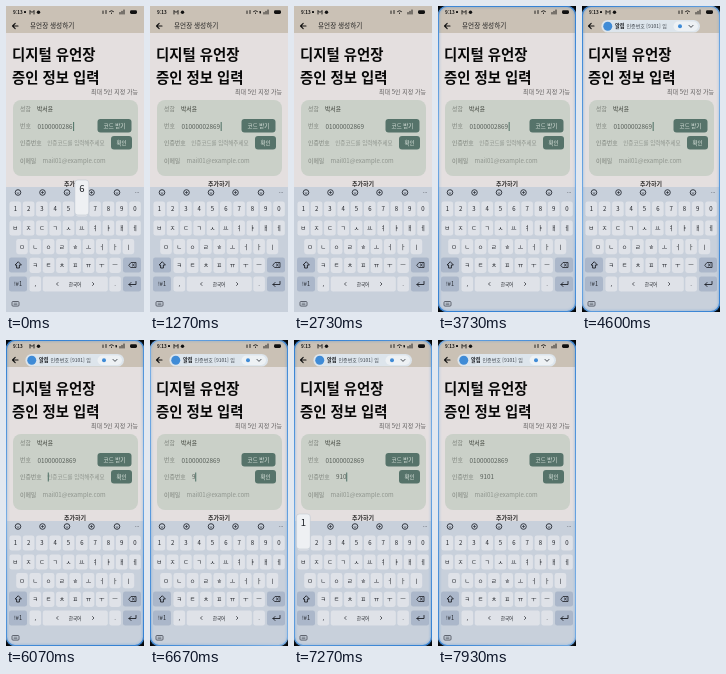
These frames come from a looping animation (138x306 px, 8000 ms). An HTML page:

```html
<!DOCTYPE html>
<html lang="ko">
<head>
<meta charset="utf-8">
<style>
html, body { margin: 0; width: 100%; height: 100%; overflow: hidden; background: #e4dfdf; }
svg { display: block; width: 138px; height: 306px; }
text { font-family: "Noto Sans CJK KR", "Noto Sans CJK", "Noto Sans", sans-serif; }
</style>
</head>
<body>
<svg id="stage" viewBox="0 0 138 306"></svg>
<script>
const LOOP = 8000;
const PHONE = '01000002869';
const LAST_DIGIT = 200, CODE_FOCUS = 4950;
const CODE = [['9', 6600], ['1', 6900], ['0', 7100], ['1', 7350]];
const PLACEHOLDER = '인증코드를 입력해주세요';
const KEY = '#dfe2e8', SPECIAL = '#abb7ca', INK = '#1d2026';

const rect = (x, y, w, h, r, fill, extra = '') =>
  `<rect x="${x}" y="${y}" width="${w}" height="${h}" rx="${r}" fill="${fill}" ${extra}/>`;
const line = (d, color = INK, w = 0.9) =>
  `<path d="${d}" fill="none" stroke="${color}" stroke-width="${w}" stroke-linecap="round" stroke-linejoin="round"/>`;
// y is the visual middle of the line
const text = (s, x, y, size, fill, extra = '') =>
  `<text x="${x}" y="${y + size * 0.36}" font-size="${size}" fill="${fill}" ${extra}>${s}</text>`;
const mid = 'text-anchor="middle"';
const medium = 'font-weight="500"', bold = 'font-weight="700"', black = 'font-weight="900"';

const keyX = i => 9.3 + 13.3 * i;
const keyRow = (chars, x0, y) => [...chars].map((c, i) => {
  const x = x0 + 13.3 * i;
  return rect(x - 5.8, y - 7.6, 11.6, 15.2, 2.4, KEY) + text(c, x, y, 6, INK, `${mid} ${medium}`);
}).join('');

function statusBar() {
  return text('9:13', 7, 6, 4.6, '#111', bold)
    + rect(18, 5, 2, 2, 0.5, '#111', 'id="dot"')
    + line('M24 8V4.5l2 2l2-2V8', '#111')
    + '<circle cx="32.5" cy="6.2" r="1.7" fill="#111"/>'
    + line('M97 7.5V5M100 7.5v-3M103.5 5.5a3 3 0 0 1 4 0M105.5 7.5v-.5M114 8V6.5M116 8V5.3M118 8V4', '#111')
    + rect(109.5, 5, 1.5, 2.5, 0.4, '#111', 'id="traffic"')
    + rect(124, 4.2, 7, 3.8, 1.4, '#111');
}

function page() {
  const label = (s, y) => text(s, 14, y, 5.9, '#7d827b');
  const button = (s, x, y, w) =>
    rect(x, y, w, 13.5, 3, '#56736a') + text(s, x + w / 2, y + 6.7, 5.5, '#dfe7e1', `${mid} ${medium}`);
  return rect(0, 0, 138, 306, 0, '#e4dfdf')
    + rect(0, 0, 138, 27, 0, '#cac1b5')
    + statusBar()
    + line('M12 20H6.7M9.2 17.3L6.5 20L9.2 22.7', '#111', 1.1)
    + text('유언장 생성하기', 24, 19.8, 6.6, '#222', medium)
    + text('디지털 유언장', 6, 49, 14.4, '#080808', black)
    + text('증인 정보 입력', 6, 72, 14.4, '#080808', black)
    + text('최대 5인 지정 가능', 132, 86.3, 6, '#5e5c5c', 'text-anchor="end"')
    + rect(7, 94, 125, 76, 8, '#cad0c8')
    + label('성함', 103) + label('번호', 120) + label('인증번호', 137) + label('이메일', 155)
    + text('박서윤', 31, 103, 5.8, '#33372f', medium)
    + text('', 31.5, 120.3, 6.3, '#555d57', 'id="phone"')
    + text('', 41.3, 137, 5.5, '', 'id="code"')
    + text('mail01@example.com', 36.5, 155, 6.1, '#8e948d')
    + button('코드 받기', 91.5, 113, 34) + button('확인', 105, 130, 21)
    + rect(0, 116, 0.9, 9, 0, '#3f665a', 'id="caret"')
    + text('추가하기', 69, 178, 6, '#2d2c2c', `${mid} ${bold}`);
}

function keyboard() {
  const tools = [12, 36.5, 61, 85.5, 111].map((x, i) =>
    `<circle cx="${x}" cy="186.5" r="2.8" fill="none" stroke="#343942"/>`
    + line(i % 2 ? `M${x - 1} 186.5h2M${x} 185.5v2` : `M${x - 1} 187q1 1 2 0`, '#343942', 0.8)).join('');
  const special = (x, y) => rect(x, y - 7.6, 18, 15.2, 2.4, SPECIAL);
  return rect(0, 181, 138, 125, 0, '#c8d0db') + tools
    + text('···', 131, 186.5, 6, '#343942', mid)
    + keyRow('1234567890', keyX(0), 203)
    + keyRow('ㅂㅈㄷㄱㅅㅛㅕㅑㅐㅔ', keyX(0), 222)
    + keyRow('ㅁㄴㅇㄹㅎㅗㅓㅏㅣ', 16, 240.6)
    + special(3, 259) + line('M12 256l-3 3h1.6v3h2.8v-3h1.6z')
    + keyRow('ㅋㅌㅊㅍㅠㅜㅡ', 29.3, 259.3)
    + special(117, 259) + line('M123 259l2-2.5h5v5h-5zM126.4 258l2 2m0-2l-2 2', INK, 0.8)
    + special(3, 278) + text('!#1', 12, 278, 5.6, INK, `${mid} ${medium}`)
    + keyRow(',', 29.3, 278)
    + rect(36.8, 270.4, 65, 15.2, 2.4, KEY) + text('한국어', 69, 278, 4.6, INK, mid)
    + line('M52 276.5l-1.5 1.5l1.5 1.5M86.5 276.5l1.5 1.5l-1.5 1.5', INK, 0.7)
    + keyRow('.', 109.1, 278)
    + special(117, 278) + line('M130 275.5v3h-7m2-2l-2 2l2 2')
    + rect(6, 295.5, 7, 4.6, 1, 'none', 'stroke="#444a55" stroke-width=".8"')
    + line('M8 297.2h3M8 298.6h3', '#444a55', 0.6);
}

function overlays() {
  return '<g id="popup">' + rect(-7, 174, 14, 35, 3, '#eef0f3', 'stroke="#b9c0cb" stroke-width=".5"')
    + text('', 0, 182.5, 9.5, INK, `${mid} id="digit"`) + '</g>'
    + '<g id="notice">' + rect(19.5, 14, 98, 12.6, 6.3, '#dde5ec', 'id="pill"')
    + '<g id="icon"><circle r="4.5" fill="#3f8bd6"/></g>'
    + '<g id="message">' + text('알림', 33, 20.3, 5.2, '#15181c', bold)
    + text('인증번호 [9101] 입', 44.5, 20.3, 5, '#3d444c')
    + rect(91.5, 15.6, 24.5, 9.4, 4.7, '#edf1f4')
    + '<circle cx="98" cy="20.3" r="2" fill="#3f8bd6"/>'
    + line('M107 19.4l2 2l2-2', '#2c3239') + '</g></g>'
    + '<g id="glow"><path fill="#000" fill-rule="evenodd" d="M0 0H138V306H0ZM9 0H129a9 9 0 0 1 9 9V297a9 9 0 0 1-9 9H9a9 9 0 0 1-9-9V9a9 9 0 0 1 9-9Z"/>'
    + '<g fill="none" stroke="url(#edge)">'
    + '<rect x=".5" y=".5" width="137" height="305" rx="8.5" stroke-width="2.6" opacity=".3" filter="url(#soft)"/>'
    + '<rect x=".5" y=".5" width="137" height="305" rx="8.5" stroke-width="1.1"/></g></g>';
}

const $ = id => document.getElementById(id);
$('stage').innerHTML = `<defs>
  <linearGradient id="edge" gradientUnits="userSpaceOnUse" x1="0" y1="0" x2="138" y2="306">
    <stop offset="0" stop-color="#2f7ed2"/><stop offset=".5" stop-color="#79aee4"/><stop offset="1" stop-color="#2f7ed2"/>
  </linearGradient>
  <filter id="soft" filterUnits="userSpaceOnUse" x="-10" y="-10" width="158" height="326"><feGaussianBlur stdDeviation=".9"/></filter>
</defs>` + page() + keyboard() + overlays();

const ramp = (t, a, b) => {
  const p = Math.min(1, Math.max(0, (t - a) / (b - a)));
  return 1 - (1 - p) ** 3;
};
const show = (id, on) => $(id).setAttribute('visibility', on ? 'visible' : 'hidden');
const set = (id, attrs) => Object.entries(attrs).forEach(([k, v]) => $(id).setAttribute(k, v));

// The caret restarts its blink whenever the field changes
const RESTARTS = [0, LAST_DIGIT + 28, 3470, CODE_FOCUS, ...CODE.map(([, at]) => at)];

function drawFields(t) {
  const code = CODE.filter(([, at]) => t >= at).map(([d]) => d).join('');
  const inCode = t >= CODE_FOCUS;
  $('phone').textContent = t < LAST_DIGIT ? PHONE.slice(0, -1) : PHONE;
  $('code').textContent = code || PLACEHOLDER;
  set('code', code
    ? { x: 42, fill: '#555d57', 'font-size': 6.3 }
    : { x: 41.3, fill: '#8e948d', 'font-size': 5.5 });

  const since = RESTARTS.filter(at => t >= at).pop();
  show('caret', (t - since) % 1000 < 500);
  set('caret', {
    x: inCode ? 41.8 + 3.5 * code.length : t < LAST_DIGIT ? 67.2 : 70.7,
    y: inCode ? 132.5 : 116
  });

  const press = [['6', -60, 75], [PHONE.at(-1), LAST_DIGIT, 400], ...CODE.map(([d, at]) => [d, at - 80, at + 40])]
    .find(([, from, to]) => t >= from && t < to);
  show('popup', press);
  if (press) {
    $('digit').textContent = press[0];
    set('popup', { transform: `translate(${keyX((+press[0] + 9) % 10)} 0)` });
  }
}

function drawNotice(t) {
  set('glow', { opacity: ramp(t, 3450, 3750) });
  set('edge', { gradientTransform: `rotate(${(t - 3450) / 2600 * 360} 69 153)` });
  const pop = ramp(t, 3780, 3980), open = ramp(t, 3930, 4300);
  const width = 12.6 + 85.9 * open;
  show('notice', pop > 0);
  set('notice', { opacity: pop });
  set('pill', { x: 68.7 - width / 2, width });
  set('icon', { transform: `translate(${75 - width / 2} 20.3) scale(${pop})` });
  set('message', { opacity: ramp(t, 4100, 4350) });
}

function frame() {
  const t = performance.now() % LOOP;
  const tick = Math.floor((t - 590) / 490) % 2 === 0;
  show('dot', tick);
  show('traffic', !tick);
  drawFields(t);
  drawNotice(t);
  requestAnimationFrame(frame);
}
frame();
</script>
</body>
</html>
```
